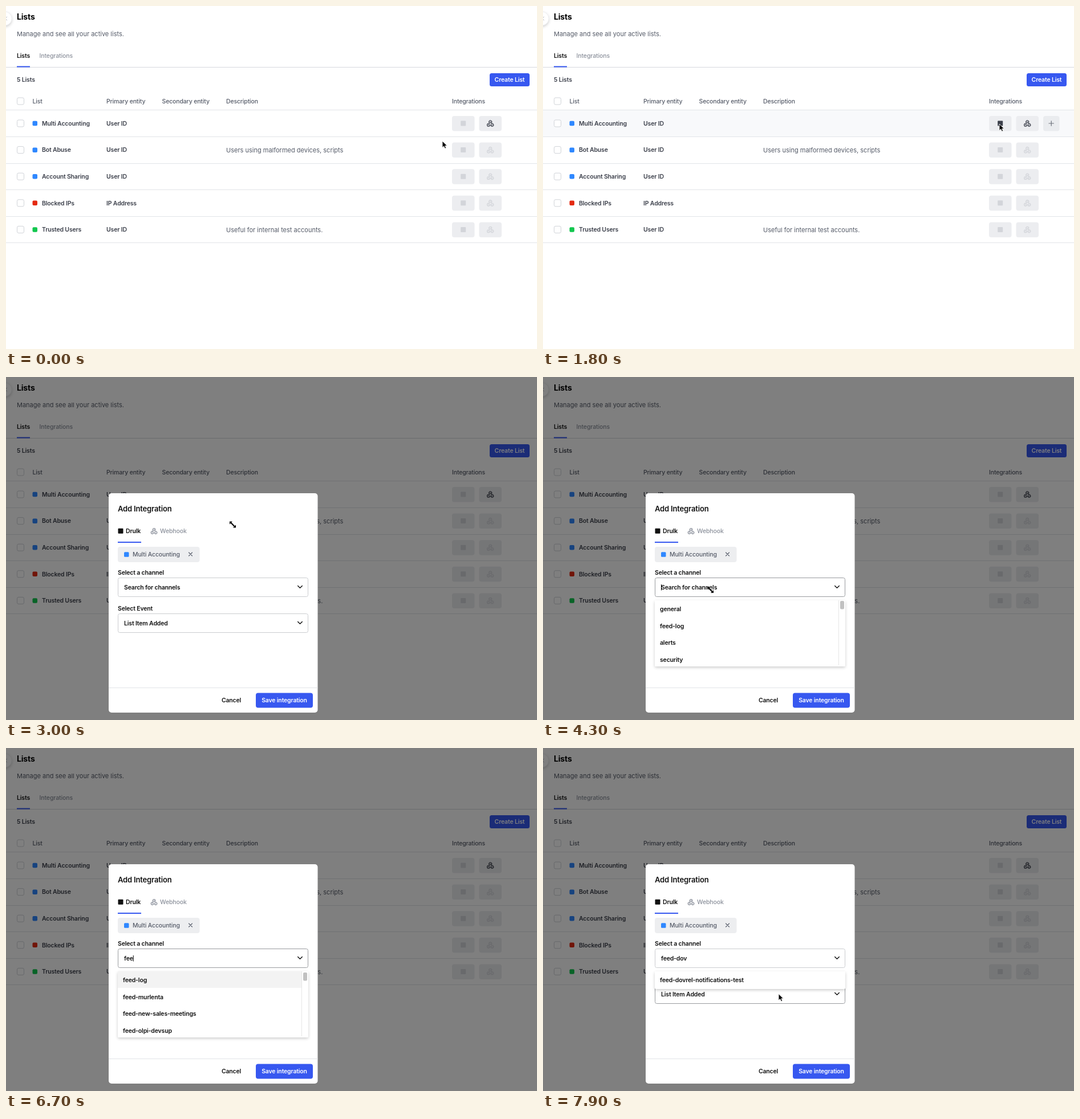
Write an HTML page that moves like this. It is 931 by 602 pixels and loops after 8 s.

```html
<!DOCTYPE html>
<html lang="en">
<head>
<meta charset="utf-8">
<title>Lists</title>
<style>
  html, body { margin: 0; width: 100%; height: 100%; overflow: hidden; background: #fff; }
  svg { display: block; width: 100vw; height: 100vh; }
  text { font: 600 10.5px Inter, "Open Sans", sans-serif; letter-spacing: -.17px; fill: #3b3f4a; white-space: pre; }
  .title { font-size: 14px; font-weight: 700; fill: #000; }
  .heading { font-size: 13px; fill: #111; }
  .plain { font-size: 11px; font-weight: 400; letter-spacing: 0; fill: #555b68; }
  .head { font-weight: 500; letter-spacing: -.15px; fill: #555b68; }
  .muted { font-weight: 500; letter-spacing: -.1px; fill: #8b909b; }
  .black { fill: #111; }
  .white { fill: #fff; }
  .mid { text-anchor: middle; }
</style>
</head>
<body>
<svg id="stage" viewBox="0 0 931 602" preserveAspectRatio="none">
  <defs>
    <filter id="shadow" x="-20%" y="-20%" width="140%" height="150%">
      <feDropShadow dx="0" dy="2" stdDeviation="2.5" flood-opacity=".2"/>
    </filter>
  </defs>
</svg>
<script>
const NS = 'http://www.w3.org/2000/svg';
const LOOP = 8000, STEP = 100, MODAL_AT = 1900, OPEN_AT = 4300, TYPE_AT = 5800, LEAVE_AT = 7700;
const BLUE = '#3758f0', DARK = '#3b3f4a', FAINT = '#d3d5da', LINE = '#e2e4e8', EDGE = '#cacccf', FOCUS = '#999b9f';
const stage = document.getElementById('stage');

function add(parent, tag, attrs, content) {
  const el = document.createElementNS(NS, tag);
  for (const key in attrs) el.setAttribute(key, attrs[key]);
  if (content !== undefined) el.textContent = content;
  parent.appendChild(el);
  return el;
}
const group = parent => add(parent, 'g', {});
const rect = (p, x, y, width, height, fill, rx = 0, more = {}) =>
  add(p, 'rect', { x, y, width, height, fill, rx, ...more });
const text = (p, x, cy, str, cls = '') => add(p, 'text', { x, y: cy + 3.8, class: cls }, str);
const stroke = (p, d, color, width = 1.3) =>
  add(p, 'path', { d, fill: 'none', stroke: color, 'stroke-width': width, 'stroke-linecap': 'round', 'stroke-linejoin': 'round' });
const show = (el, on) => el.setAttribute('display', on ? 'inline' : 'none');

function hookIcon(p, x, y, color, scale = 1) {
  const g = add(p, 'g', { transform: `translate(${x} ${y}) scale(${scale})` });
  for (const a of [0, 120, 240])
    stroke(g, 'M2.2-2.6A2.4 2.4 0 1 0-1.2-1.52L-3.1 1.8', color).setAttribute('transform', `rotate(${a})`);
}
const appIcon = (p, x, y, color) => rect(p, x - 4.5, y - 4.5, 9, 9, color, 1);
const checkbox = (p, cy) => rect(p, 19.5, cy - 6, 12, 12, '#fff', 2.5, { stroke: '#d0d3d8' });

// Page
const page = group(stage);
rect(page, 0, 0, 931, 602, '#fff');
add(page, 'circle', { cx: -2, cy: 22, r: 12, fill: '#fff', filter: 'url(#shadow)', stroke: LINE, 'stroke-width': .6 });
stroke(page, 'M1.5 19L-1 22L1.5 25', '#b5b8be', 1);
text(page, 19, 20.5, 'Lists', 'title');
text(page, 19, 49.3, 'Manage and see all your active lists.', 'plain');
text(page, 19, 87, 'Lists', 'black');
text(page, 58.5, 87, 'Integrations', 'muted');
rect(page, 0, 107, 931, 1, '#d5d8dd');
rect(page, 19, 105.5, 23, 2, BLUE);
text(page, 19, 129.5, '5 Lists');
rect(page, 848, 118, 70, 23, BLUE, 3.5);
text(page, 883, 129.5, 'Create List', 'white mid');

const rowHover = rect(page, 0, 183, 931, 46, '#f8f9fb');
checkbox(page, 167);
for (const [x, label] of [[46.5, 'List'], [176, 'Primary entity'], [273.5, 'Secondary entity'], [386, 'Description'], [782, 'Integrations']])
  text(page, x, 167, label, 'head');
rect(page, 0, 182, 931, 1, LINE);

let appCell;
[
  ['#2f88ff', 'Multi Accounting', 'User ID', ''],
  ['#2f88ff', 'Bot Abuse', 'User ID', 'Users using malformed devices, scripts'],
  ['#2f88ff', 'Account Sharing', 'User ID', ''],
  ['#e42a12', 'Blocked IPs', 'IP Address', ''],
  ['#11c74f', 'Trusted Users', 'User ID', 'Useful for internal test accounts.']
].forEach(([color, name, entity, note], i) => {
  const cy = 206 + i * 46.6;
  checkbox(page, cy);
  rect(page, 46.5, cy - 4.2, 8.5, 8.5, color, 2);
  text(page, 63, cy, name);
  text(page, 176, cy, entity);
  text(page, 386, cy + .5, note, 'plain');
  for (const x of [782, 829.5]) rect(page, x, cy - 13, 39.5, 26.5, '#ecedf0', 4);
  const icon = appIcon(page, 801.7, cy, FAINT);
  if (!i) appCell = icon;
  hookIcon(page, 849.2, cy + 1, i ? FAINT : DARK);
  rect(page, 0, Math.round(cy + 23), 931, 1, LINE);
});
const plus = group(page);
rect(plus, 877, 193, 28.5, 26.5, '#eaecef', 4);
stroke(plus, 'M887 206H895.4M891.2 201.8V210.2', '#6b707b', 1.2);

// Dialog
const modal = group(stage);
rect(modal, 0, 0, 931, 602, '#000', 0, { opacity: .5 });
rect(modal, 180, 204, 366.5, 385, '#fff', 5);
text(modal, 196, 232.6, 'Add Integration', 'heading');
appIcon(modal, 201, 270.3, '#111');
text(modal, 210, 270.5, 'Drulk', 'black');
hookIcon(modal, 259.5, 271.3, '#8b909b', .95);
text(modal, 270, 270.5, 'Webhook', 'muted');
rect(modal, 196, 289, 41, 2, BLUE);
rect(modal, 196, 298, 143.5, 27, '#edeef0', 4);
rect(modal, 207, 307.3, 8.5, 8.5, '#2f88ff', 1.5);
text(modal, 222, 311.5, 'Multi Accounting', 'head');
stroke(modal, 'M320.5 308L326.5 314M326.5 308L320.5 314', '#555b68', 1.1);

function field(y, label) {
  text(modal, 196, y - 9.3, label, 'black');
  const box = rect(modal, 196.5, y + .5, 333, 33, '#fff', 3, { stroke: EDGE });
  stroke(modal, `M511.7 ${y + 14.5}L515.5 ${y + 18.3}L519.3 ${y + 14.5}`, '#111', 1.4);
  return box;
}
const channelBox = field(352, 'Select a channel');
const eventBox = field(415, 'Select Event');
const query = text(modal, 207, 369, '', 'black');
text(modal, 207, 431.7, 'List Item Added', 'black');
const caret = rect(modal, 207, 364, 1, 10.5, '#000');
rect(modal, 180, 545, 366.5, 1, LINE);
text(modal, 395, 567.5, 'Cancel', 'black mid');
rect(modal, 438, 554.5, 100, 26, BLUE, 4);
text(modal, 488, 567.5, 'Save integration', 'white mid');

// Channel menu
const menu = group(modal);
const panel = rect(menu, 196, 392, 334, 116, '#fff', 2, { filter: 'url(#shadow)' });
const active = rect(menu, 196, 392, 322, 29, '#f3f3f3');
const options = [0, 1, 2, 3].map(i => text(menu, 205, 407.2 + i * 29.5, '', 'black'));
const bar = group(menu);
rect(bar, 518, 392, 1, 114, '#e6e6e6');
const thumb = rect(bar, 521, 393, 7, 14.5, '#c1c1c1', 2);

const ALL = ['general', 'feed-log', 'alerts', 'security'];
const FEEDS = ['feed-log', 'feed-murlenta', 'feed-new-sales-meetings', 'feed-olpi-devsup'];
const ONE = ['feed-dovrel-notifications-test'];
const WORD = 'feed-dov';
const KEYS = [TYPE_AT, 6200, 6500, 6800, 6900, 7000, 7100, 7300];

// Pointer
const pointer = group(stage);
const arrow = add(pointer, 'path', {
  d: 'M0 0V11.6L2.7 9.1L4.6 13.2L6.7 12.3L4.9 8.3H8.5Z',
  fill: '#000', stroke: '#fff', 'stroke-width': .9
});
const resize = add(pointer, 'path', {
  d: 'M-5.5-5.5H-.6L-2.2-3.7L3.7 2.2L5.5 .6V5.5H.6L2.2 3.7L-3.7-2.2L-5.5-.6Z',
  fill: '#000', stroke: '#fff', 'stroke-width': .9, 'paint-order': 'stroke'
});
const PATH = [
  [0, 765, 237], [900, 788, 221], [1500, 800, 207], [2300, 800, 207], [3000, 397.5, 259], [3200, 390, 264],
  [4100, 293.5, 373.5], [4600, 293.5, 373.5], [5000, 338, 414], [5300, 342, 420], [7600, 342, 420], [7900, 413, 431.5]
];
function pointerAt(t) {
  const i = PATH.findIndex(p => p[0] > t);
  if (i < 0) return PATH[PATH.length - 1].slice(1);
  const [t0, x0, y0] = PATH[i - 1], [t1, x1, y1] = PATH[i];
  const k = (t - t0) / (t1 - t0), e = k * k * (3 - 2 * k);
  return [x0 + (x1 - x0) * e, y0 + (y1 - y0) * e];
}

function render(t) {
  const [x, y] = pointerAt(t);
  const dialog = t >= MODAL_AT, open = t >= OPEN_AT, left = t >= LEAVE_AT;
  const overRow = !dialog && y < 229;
  show(rowHover, overRow);
  show(plus, overRow);
  appCell.setAttribute('fill', overRow && x > 782 && y < 219.5 ? DARK : FAINT);

  show(modal, dialog);
  const over = top => x > 196 && x < 530 && y > top && y < top + 34;
  channelBox.setAttribute('stroke', (open && !left) || over(352) ? FOCUS : EDGE);
  eventBox.setAttribute('stroke', left && over(415) ? FOCUS : EDGE);

  const typed = WORD.slice(0, KEYS.filter(k => k <= t).length);
  query.textContent = typed || 'Search for channels';
  const blinkOn = t >= TYPE_AT || (t - OPEN_AT) % 1000 < 500;
  show(caret, open && !left && blinkOn);
  caret.setAttribute('x', 207 + (typed ? query.getComputedTextLength() : 0));

  const list = typed.length > 5 ? ONE : typed ? FEEDS : ALL;
  const single = list === ONE;
  show(menu, open);
  options.forEach((el, i) => el.textContent = list[i] || '');
  panel.setAttribute('height', single ? 31 : 116);
  active.setAttribute('width', single ? 334 : 322);
  show(active, !left && y > 392 && y < 422);
  show(bar, !single);
  thumb.setAttribute('y', typed ? 394 : 393);

  const sizing = t >= 2800 && t < 4700;
  show(pointer, t < TYPE_AT || left);
  show(arrow, !sizing);
  show(resize, sizing);
  pointer.setAttribute('transform', `translate(${x} ${y})`);
}

const start = performance.now();
function tick() {
  const t = (performance.now() - start) % LOOP;
  render(Math.floor(t / STEP) * STEP);
  requestAnimationFrame(tick);
}
tick();
</script>
</body>
</html>
```
